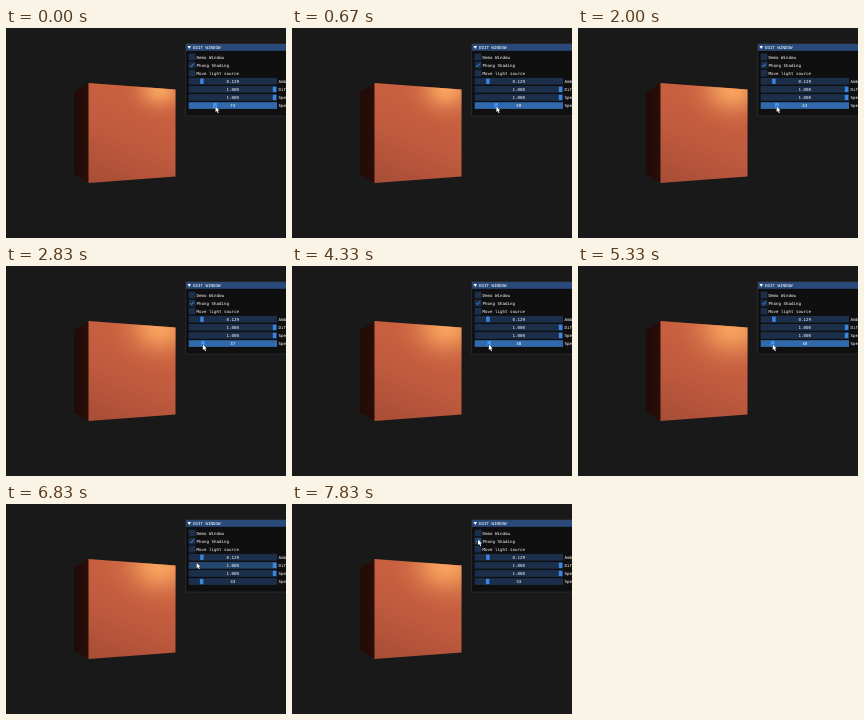
Animation, 280 px wide and 210 px high, one loop 8 s. Source, as an HTML page with a canvas:

```html
<!DOCTYPE html>
<html lang="en">
<head>
<meta charset="utf-8">
<title>Shaded cube</title>
<style>
html, body { margin: 0; width: 100%; height: 100%; overflow: hidden; background: #191919; }
canvas { display: block; }
</style>
</head>
<body>
<canvas id="stage" width="280" height="210"></canvas>
<script>
const ctx = document.getElementById('stage').getContext('2d');
const LOOP = 8000, RATE = 6;
const LEFT = 182.7, BAR = 88.3, BOX = 6.7, TOP = 25.6, PITCH = 8.1;
const FRAME = { idle: '#1b2e4a', hover: '#24476f', active: '#3169ad' };

// step, pointer x, pointer y, specular power
const KEYS = [
  [0, 209.5, 78.5, 74], [7, 200.5, 78.5, 48], [17, 196.8, 78.5, 37],
  [26, 196.8, 78.5, 38], [32, 194.7, 78.5, 30], [36, 195.3, 78.5, 33],
  [38, 194.5, 76, 33], [39, 192.7, 69.5, 33], [45, 186.5, 37, 33], [47, 186, 35.5, 33]
];
const RELEASE = 37;

function poseAt(step) {
  const i = Math.max(1, KEYS.findIndex(k => k[0] >= step));
  const a = KEYS[i - 1], b = KEYS[i];
  const u = (step - a[0]) / (b[0] - a[0]);
  const [, x, y, power] = a.map((v, n) => v + (b[n] - v) * u);
  return { x, y, power: Math.round(power) };
}

function rect(x, y, w, h, color) {
  ctx.fillStyle = color;
  ctx.fillRect(x, y, w, h);
}

function trace(points) {
  ctx.beginPath();
  points.forEach(([x, y]) => ctx.lineTo(x, y));
  ctx.closePath();
}

function polygon(points, color) {
  trace(points);
  ctx.fillStyle = color;
  ctx.fill();
}

function text(value, x, y, align = 'left') {
  ctx.font = '4.15px "DejaVu Sans Mono", monospace';
  ctx.textAlign = align;
  ctx.fillStyle = '#fff';
  ctx.fillText(value, x, y);
}

function gradient(shape, stops) {
  stops.forEach(([at, color]) => shape.addColorStop(at, color));
  return shape;
}

function drawCube(power) {
  polygon([[68, 64], [82.5, 55], [82.5, 155], [68, 146.5]],
    gradient(ctx.createLinearGradient(68, 0, 83, 0), [[0, '#200b06'], [1, '#2a0e07']]));

  const face = [[82.5, 55], [169.5, 61.5], [169.5, 148.5], [82.5, 155]];
  polygon(face, gradient(ctx.createLinearGradient(145, 55, 104, 158),
    [[0, '#cc6240'], [0.5, '#c25c3f'], [1, '#a94e37']]));

  ctx.save();
  trace(face);
  ctx.clip();
  ctx.translate(154, 62);
  ctx.scale(1.2, 1);
  const radius = 3 * 98 / Math.sqrt(power);
  const glow = ctx.createRadialGradient(0, 0, 0, 0, 0, radius);
  for (let i = 0; i <= 12; i++) {
    const u = i / 12;
    const strength = 0.85 * Math.exp(-4.5 * u * u) * (1 - u ** 6);
    glow.addColorStop(u, `rgba(255,174,100,${strength})`);
  }
  rect(-100, -20, 200, 130, glow);
  ctx.restore();
}

function checkbox(row, label, checked, hovered) {
  const y = TOP + row * PITCH;
  rect(LEFT, y, BOX, BOX, hovered ? FRAME.hover : FRAME.idle);
  if (checked) {
    ctx.beginPath();
    ctx.moveTo(LEFT + 1.5, y + 3.5);
    ctx.lineTo(LEFT + 2.8, y + 4.9);
    ctx.lineTo(LEFT + 5.3, y + 1.8);
    ctx.strokeStyle = '#4296fa';
    ctx.lineWidth = 0.9;
    ctx.stroke();
  }
  text(label, LEFT + BOX + 1.2, y + 4.9);
}

function slider(row, label, value, ratio, state) {
  const y = TOP + row * PITCH;
  rect(LEFT, y, BAR, BOX, FRAME[state]);
  rect(LEFT + 0.7 + ratio * (BAR - 4.9), y + 0.7, 3.5, BOX - 1.4,
    state === 'active' ? '#4296fa' : '#3d85e0');
  text(value, LEFT + BAR / 2, y + 4.9, 'center');
  text(label, LEFT + BAR + 1.4, y + 4.9);
}

function drawPanel(step, power) {
  // The panel reacts one step after the pointer.
  const seen = poseAt(Math.max(0, step - 1));
  const over = row => {
    const y = TOP + row * PITCH;
    return seen.y >= y && seen.y < y + BOX;
  };
  const stateOf = row => {
    if (step < RELEASE) return row === 6 ? 'active' : 'idle';
    return over(row) ? 'hover' : 'idle';
  };

  rect(180, 16, 110, 72, '#0f0f0f');
  rect(180, 16, 110, 6.8, '#294a7a');
  ctx.strokeStyle = '#34343b';
  ctx.lineWidth = 0.6;
  ctx.strokeRect(179.8, 15.8, 110, 72.2);
  polygon([[181.5, 18], [185, 18], [183.25, 21]], '#fff');
  text('EDIT WINDOW', 187, 21);

  checkbox(0, 'Demo Window', false, over(0));
  checkbox(1, 'Phong Shading', true, over(1));
  checkbox(2, 'Move light source', false, over(2));
  slider(3, 'Ambient', '0.129', 0.129, stateOf(3));
  slider(4, 'Diffuse', '1.000', 1, stateOf(4));
  slider(5, 'Specular', '1.000', 1, stateOf(5));
  slider(6, 'Specular power', power, (power - 1) / 255, stateOf(6));
}

function drawPointer(x, y) {
  const shape = [[0, 0], [0, 5.6], [1.3, 4.5], [2.3, 6.7], [3.2, 6.3], [2.3, 4.1], [4, 4]];
  trace(shape.map(([dx, dy]) => [x + dx, y + dy]));
  ctx.strokeStyle = '#000';
  ctx.lineWidth = 0.8;
  ctx.stroke();
  ctx.fillStyle = '#fff';
  ctx.fill();
}

function draw(now) {
  const step = Math.floor((now % LOOP + 4) * RATE / 1000) % (LOOP * RATE / 1000);
  const { x, y, power } = poseAt(step);
  rect(0, 0, 280, 210, '#191919');
  drawCube(power);
  drawPanel(step, power);
  drawPointer(x, y);
}

const start = performance.now();
function tick() {
  draw(performance.now() - start);
  requestAnimationFrame(tick);
}
tick();
</script>
</body>
</html>
```
